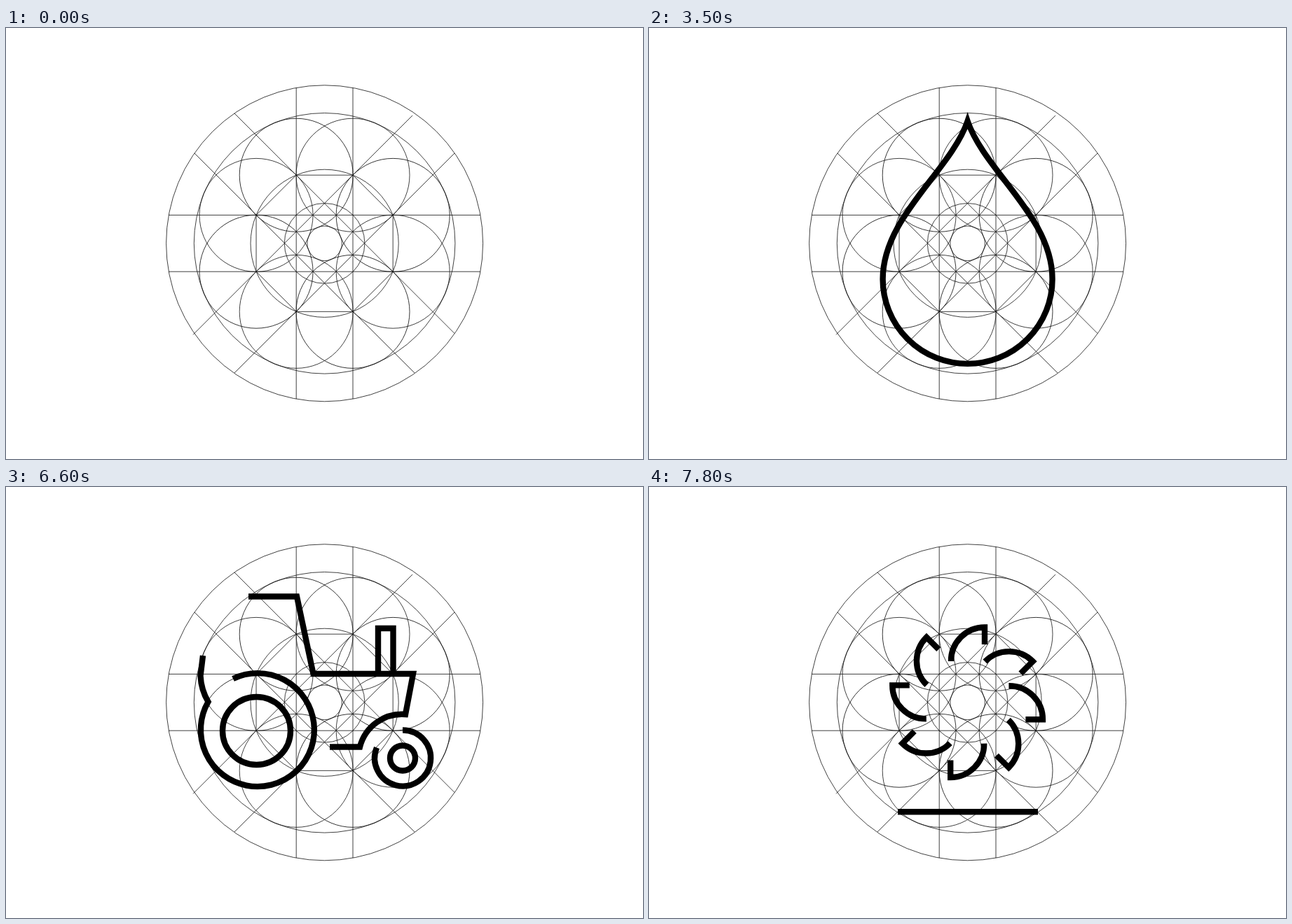
Animation of 909x616 px, one loop 8 s. Source, as an HTML page:

```html
<!DOCTYPE html>
<html lang="en">
<head>
<meta charset="utf-8">
<title>Icons on a circular grid</title>
<style>
  html, body { margin: 0; width: 100%; height: 100%; overflow: hidden; background: #fff; }
  svg { display: block; width: 909px; height: 616px; fill: none; stroke: #000; }
  #grid { stroke-width: .8; stroke: #111; }
  .icon { stroke-width: 8.4; stroke-miterlimit: 6; opacity: 0; }
</style>
</head>
<body>
<svg id="stage" viewBox="0 0 909 616"><g id="grid"></g></svg>
<script>
const CX = 454.6, CY = 307.8, LOOP = 8000;

const path = d => `<path d="${d}"/>`;
const ring = (x, y, r) => `<circle cx="${x}" cy="${y}" r="${r}"/>`;
const spin = (s, n) => Array.from({ length: n }, (_, i) =>
  `<g transform="rotate(${i * 360 / n} ${CX} ${CY})">${s}</g>`).join('');
const mirror = s => s + `<g transform="matrix(-1 0 0 1 ${2 * CX} 0)">${s}</g>`;

// Point at distance r and angle a in degrees, clockwise from the right.
const at = (r, a, x = CX, y = CY) => {
  const t = a * Math.PI / 180;
  return `${(x + r * Math.cos(t)).toFixed(2)} ${(y + r * Math.sin(t)).toFixed(2)}`;
};
const rays = (x, y, r1, r2, angles) =>
  path(angles.map(a => `M${at(r1, a, x, y)}L${at(r2, a, x, y)}`).join(''));

function drawGrid() {
  const R = 105.6, half = 40.4, far = 222.4;
  const sides = spin(path(`M${at(R, -112.5)}L${at(R, -67.5)}`), 8);
  const petals = spin(ring(...at(R, 22.5).split(' '), 81), 8);
  const circles = [226, 186.3, 105.6, 57.3, 24.8].map(r => ring(CX, CY, r)).join('');
  const cross = path([-half, half].map(o =>
    `M${CX + o} ${CY - far}V${CY + far}M${CX - far} ${CY + o}H${CX + far}`).join(''));
  const diagonals = path('M326 122L640 436.5M269 179L583 493M326 493L640 179M267 438.3L580 125');
  return circles + petals + sides + cross + diagonals;
}

function flower() {
  let d = `M${at(167.8, 0)}`;
  for (let a = 45; a <= 360; a += 45) d += `A81 81 0 0 1 ${at(167.8, a)}`;
  return path(d + 'Z') + ring(CX, CY, 25);
}

const windmill = () => ring(CX, CY, 25) +
  spin(path('M446 283A239 239 0 0 1 454.6 121A239 239 0 0 1 470.5 253'), 3) +
  path('M471 325L495 490M433 361L414.5 490');

const drop = () => path('M454.6 133C430 205 333.6 270 333.6 359A121 121 0 0 0 575.6 359C575.6 270 479 205 454.6 133Z');

const solar = () =>
  path(`M${at(81, 12.2, CX, 121)}A81 81 0 0 1 ${at(81, 167.8, CX, 121)}`) +
  rays(CX, 121, 81, 113, [45, 90, 135]) +
  rays(CX, 121, 81, 97, [22.5, 67.5, 112.5, 157.5]) +
  mirror(path('M325 320L332 327H364L375 318L378 303L370 297' +
    'M407 297L397 304L396 319L405 327H436L445 319V303L436 297' +
    'M315 347L326 341H361L369 348L363 372L353 378H317L308 372' +
    'M398 341H437L444 348L443 371L434 378H394L387 371L389 350Z' +
    'M297 405L310 397H348L358 405L352 435L338 444' +
    'M387 444L377 435L381 406L392 397H432L442 406L441 435L430 444'));

const sprout = () => path(`M${CX} 490V300`) +
  mirror(path('M454.6 370C390 370 310 335 302 230C400 235 454.6 280 454.6 370'));

const bolt = () => path('M490 176L370 330H450L420 455L540 285H460Z');

function hazard() {
  const r = 55, R = 168;
  return ring(CX, CY, 25.3) + spin(path(
    `M${at(r, 60)}L${at(R, 60)}A${R} ${R} 0 0 1 ${at(R, 120)}L${at(r, 120)}A${r} ${r} 0 0 0 ${at(r, 60)}Z`), 3);
}

const factory = () => path('M279 482V159H340V300L430 240V300L520 240V300L625 240V482ZM340 400H400M430 400H490M520 400H580');

const tractor = () => ring(357.5, 348.5, 48.5) + ring(566, 387.5, 18) +
  path('M324 274A81 81 0 1 1 288.5 307A81 81 0 0 1 277.5 270L281 241' +
    'M346 156.5H415L438.5 267H581L570 325A62 62 0 0 0 505 371.5H462' +
    'M531 267V202H552.5V267M566 347.5A40 40 0 1 1 529 372.5');

const globe = () => ring(450, 303.5, 181.8) +
  '<ellipse cx="450" cy="303.5" rx="81" ry="181.8"/>' + path('M268 303.5H632');

const house = () => path('M611 266L454.5 139.5L301 267.5H333V449H454.5' +
  'M455 366H515V449.5H576V308M385 326V267.5H444V326');

const truck = () => ring(336, 426, 36) + ring(530, 426, 36) +
  path('M296 420H269V176H470V420M376 420H490M570 420H598V320L550 250H470');

const monitor = () => path('M297 176H598V380H297ZM447.5 380V431M380 431H515');

const sun = () => ring(CX, 275.5, 81) +
  rays(CX, 275.5, 110, 160, [0, 45, 90, 135, 180, 225, 270, 315]);

const turbine = () => spin(path('M431 249A48 48 0 0 1 479 200.5V225'), 8) +
  path('M355 464.3H555');

const scenes = [
  [500, flower], [2500, windmill], [3500, drop], [4500, solar], [5500, sprout],
  [6000, hazard], [6200, bolt], [6400, factory], [6600, tractor], [6800, globe],
  [7000, house], [7200, truck], [7400, monitor], [7600, sun], [7800, turbine]
];

const stage = document.getElementById('stage');
document.getElementById('grid').innerHTML = drawGrid();

scenes.forEach(([start, draw], i) => {
  const end = i + 1 < scenes.length ? scenes[i + 1][0] : LOOP;
  const g = document.createElementNS('http://www.w3.org/2000/svg', 'g');
  g.setAttribute('class', 'icon');
  g.innerHTML = draw();
  stage.append(g);
  const easing = 'steps(1, end)';
  g.animate([
    { opacity: 0, offset: 0, easing },
    { opacity: 1, offset: start / LOOP, easing },
    { opacity: 0, offset: end / LOOP, easing },
    { opacity: 0, offset: 1 }
  ], { duration: LOOP, iterations: Infinity });
});
</script>
</body>
</html>
```
